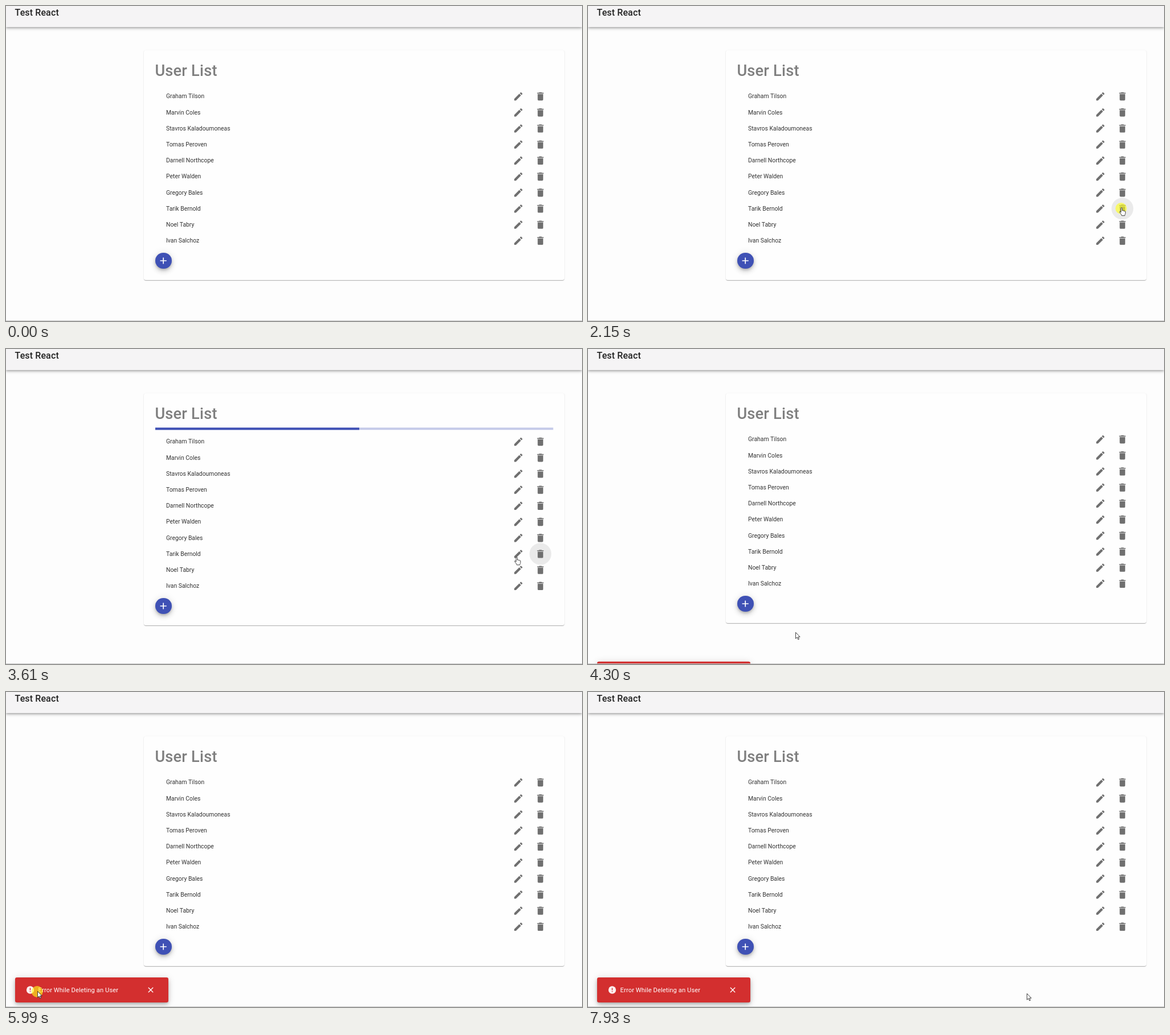
An HTML page that plays this animation: 1011 px wide and 554 px high, repeating every 8000 ms.

```html
<!DOCTYPE html>
<html lang="en">
<head>
<meta charset="utf-8">
<title>User list</title>
<style>
html, body { margin: 0; width: 100%; height: 100%; overflow: hidden; background: #fdfdfd; }
#stage { position: relative; width: 1011px; height: 554px; overflow: hidden; }
#stage > * { position: absolute; }
#top { left: 0; top: -20px; width: 1011px; height: 57px; background: #f5f4f5;
  box-shadow: 0 1.6px 3.2px -.8px #0003, 0 3.2px 4px #00000024, 0 .8px 8px #0000001f; }
#card { left: 242px; top: 78px; width: 738px; height: 404px; border-radius: 3.2px; background: #fefefe;
  box-shadow: 0 1.6px .8px -.8px #0003, 0 .8px .8px #00000024, 0 .8px 2.4px #0000001f; }
#fab, #snack { box-shadow: 0 2.4px 4px -.8px #0003, 0 4.8px 8px #00000024, 0 .8px 14px #0000001f; }
#fab { left: 261.8px; top: 433.6px; width: 28.8px; height: 28.8px; border-radius: 50%; background: #3f51b5; }
#snack { left: 15.5px; top: 502px; width: 269px; height: 44px; border-radius: 3.2px; background: #d32f2f; }
svg { left: 0; top: 0; font-family: Roboto, sans-serif; }
</style>
</head>
<body>
<div id="stage">
  <div id="top"></div>
  <div id="card"></div>
  <div id="fab"></div>
  <div id="snack"></div>
  <svg width="1011" height="554" viewBox="0 0 1011 554">
    <defs>
      <path id="pencil" d="M3 17.25V21h3.75L17.81 9.94l-3.75-3.75zM20.71 7.04a1 1 0 0 0 0-1.41l-2.34-2.34a1 1 0 0 0-1.41 0l-1.83 1.83 3.75 3.75z"/>
      <path id="trash" d="M6 19c0 1.1.9 2 2 2h8c1.1 0 2-.9 2-2V7H6zM19 4h-3.5l-1-1h-5l-1 1H5v2h14z"/>
    </defs>
    <text x="15.5" y="17.2" font-size="16" font-weight="500" letter-spacing=".12" fill="#212121">Test React</text>
    <text x="261.4" y="122.5" font-size="27.2" font-weight="500" letter-spacing=".2" fill="#7f7f7f">User List</text>
    <g id="progress">
      <path fill="#c5cae9" d="M262 138.3h698.5v4H262z"/>
      <rect id="bar1" y="138.3" height="4" fill="#3f51b5"/>
      <rect id="bar2" y="138.3" height="4" fill="#3f51b5"/>
    </g>
    <g id="list">
      <circle id="editHalo" cx="899.3" cy="356.4" r="19.2"/>
      <circle id="trashHalo" cx="938" cy="356.4" r="19.2"/>
      <circle id="ripple" cx="938" cy="356.4"/>
      <g id="rows" font-size="10.4" fill="#333"></g>
      <path d="M270.6 448h11.2M276.2 442.4v11.2" stroke="#fff" stroke-width="1.7"/>
    </g>
    <g id="message">
      <circle cx="42.5" cy="524" r="6.65" fill="#fff" opacity=".92"/>
      <path d="M42.5 520.6v4M42.5 526v1.4" stroke="#d32f2f" stroke-width="1.4"/>
      <rect id="selection" x="57" y="517.6" height="13.2" fill="#3168cf"/>
      <text x="56.6" y="528.1" font-size="11.2" letter-spacing=".08" fill="#fff">Error While Deleting an User</text>
      <path d="M249.8 519.8l8.4 8.4M258.2 519.8l-8.4 8.4" stroke="#fff" stroke-width="1.3"/>
    </g>
    <path d="M0 553.5h1011" stroke="#c9c9c9"/>
    <g id="mouse">
      <circle id="press" cx="-.3" cy="1" r="10" fill="#ffff1a" opacity=".62"/>
      <g fill="#fff" stroke="#222" stroke-width="1.3" stroke-linejoin="round">
        <path id="arrow" transform="translate(.5 .4) scale(.66)" d="M0 0V16.5L3.9 13l2.6 6 2.6-1.1L6.5 12H11.5z"/>
        <path id="hand" transform="translate(-3.8 -.5) scale(.66)" d="M5 13V2.5a1.7 1.7 0 0 1 3.4 0V8.5c.3-1.3 3-1 3 .6.4-1 2.8-.7 2.8.8.5-.8 2.6-.4 2.6 1.2V15c0 2.5-1.5 3.5-1.8 6.5H7C6.5 18.5 3.6 15.5 1.5 12.6.2 10.8 2.5 9.6 3.6 11z"/>
      </g>
    </g>
  </svg>
</div>
<script>
const LOOP = 8000, FPS = 0.013, PITCH = 28.2;
const LOADING = [2299, 4225], SNACK_AT = 4303;
const PRESSES = [2150, 5920, 6765];
const names = ['Graham Tilson', 'Marvin Coles', 'Stavros Kaladoumoneas', 'Tomas Peroven', 'Darnell Northcope',
  'Peter Walden', 'Gregory Bales', 'Tarik Bernold', 'Noel Tabry', 'Ivan Salchoz'];
// Pointer route: time, x, y
const route = [
  [231, 906, 462], [308, 875, 444], [385, 875, 444], [700, 925, 398], [850, 960, 368], [1000, 936, 355],
  [3538, 936, 355], [3615, 896, 366], [3769, 790, 405], [4154, 450, 475], [4300, 364, 498], [4615, 364, 498],
  [5000, 157, 510], [5308, 46, 522], [5462, 54, 528], [5538, 54, 528], [5769, 54, 526], [6000, 55, 526],
  [6385, 186, 526], [6462, 186, 526], [6692, 209, 524], [6923, 209, 524], [7154, 264, 525], [7231, 264, 525],
  [7385, 256, 522], [7462, 256, 522], [7920, 770, 530]
];

const $ = id => document.getElementById(id);
const set = (id, attrs) => { for (const k in attrs) $(id).setAttribute(k, attrs[k]); };
const show = (id, on) => { $(id).style.display = on ? '' : 'none'; };
const clamp = (v, lo = 0, hi = 1) => Math.min(hi, Math.max(lo, v));
const ramp = (t, a, b) => clamp((t - a) / (b - a));
const between = (t, a, b) => t >= a && t < b;

function bezier(x1, y1, x2, y2) {
  const at = (s, a, b) => 3 * (1 - s) ** 2 * s * a + 3 * (1 - s) * s * s * b + s ** 3;
  return x => {
    let lo = 0, hi = 1;
    for (let i = 0; i < 24; i++) {
      const mid = (lo + hi) / 2;
      if (at(mid, x1, x2) < x) lo = mid; else hi = mid;
    }
    return at(lo, y1, y2);
  };
}
const easeFirst = bezier(.65, .815, .735, .395);
const easeSecond = bezier(.165, .84, .44, 1);
const easeOut = bezier(0, 0, .2, 1);

$('rows').innerHTML = names.map((name, i) => {
  const y = i * PITCH;
  const icon = (id, x) => `<use href="#${id}" fill="#6f6f6f" transform="translate(${x - 9.6} ${y + 149.4}) scale(.8)"/>`;
  return `<text x="281" y="${y + 162.3}">${name}</text>` + icon('pencil', 899.3) + icon('trash', 938);
}).join('');

function pointer(t) {
  const i = route.findIndex(p => p[0] > t);
  if (i < 0) return route[route.length - 1].slice(1);
  const [a, b] = [route[Math.max(0, i - 1)], route[i]];
  const p = ramp(t, a[0], b[0]);
  return [a[1] + (b[1] - a[1]) * p, a[2] + (b[2] - a[2]) * p];
}

function bar(id, from, to) {
  const [a, b] = [clamp(from), clamp(to)];
  set(id, { x: 262 + 698.5 * a, width: 698.5 * Math.max(0, b - a) });
}

function draw(t) {
  const [x, y] = pointer(t);
  const loading = between(t, ...LOADING);
  const shift = loading ? 4 : 0;

  // Loading bar pushes the list down
  show('progress', loading);
  const p1 = easeFirst(ramp(t, LOADING[0], LOADING[0] + 1260));
  const p2 = easeSecond(ramp(t, LOADING[0] + 1150, LOADING[0] + 2410));
  bar('bar1', -.35 + 1.35 * p1, 1.9 * p1);
  bar('bar2', -2 + 3.07 * p2, 1.08 * p2);
  set('list', { transform: `translate(0 ${shift})` });
  $('card').style.height = 404 + shift + 'px';
  $('fab').style.transform = `translateY(${shift}px)`;

  // Hover and ripple
  set('trashHalo', { opacity: .08 * (ramp(t, 900, 1075) - ramp(t, 3620, 3770)) });
  set('editHalo', { opacity: .04 * (ramp(t, 3620, 3690) - ramp(t, 3690, 3840)) });
  set('ripple', { r: 19.2 * easeOut(ramp(t, 2155, 2705)), opacity: .14 * (1 - ramp(t, 2300, 2850)) });

  // Error message
  const drop = 52 * (1 - easeOut(ramp(t, SNACK_AT, SNACK_AT + 225)));
  for (const id of ['snack', 'message']) {
    show(id, t >= SNACK_AT);
    $(id).style.transform = `translateY(${drop}px)`;
  }
  set('selection', { width: between(t, 6000, 6850) ? clamp(x, 57, 187) - 57 : 0 });

  // Pointer
  const onRow = between(y, 145 + shift, 145 + shift + PITCH * names.length);
  const onIcon = onRow && (Math.abs(x - 899) < 19 || Math.abs(x - 938) < 19);
  const onClose = t > SNACK_AT && Math.hypot(x - 254, y - 524) < 8;
  show('mouse', t > 220);
  set('mouse', { transform: `translate(${x} ${y})` });
  show('hand', onIcon || onClose);
  show('arrow', !(onIcon || onClose));
  show('press', PRESSES.some(s => between(t, s, s + 150)));
}

function tick() {
  const t = performance.now() % LOOP;
  draw(Math.floor((t + 12) * FPS) / FPS);
  requestAnimationFrame(tick);
}
tick();
</script>
</body>
</html>
```
